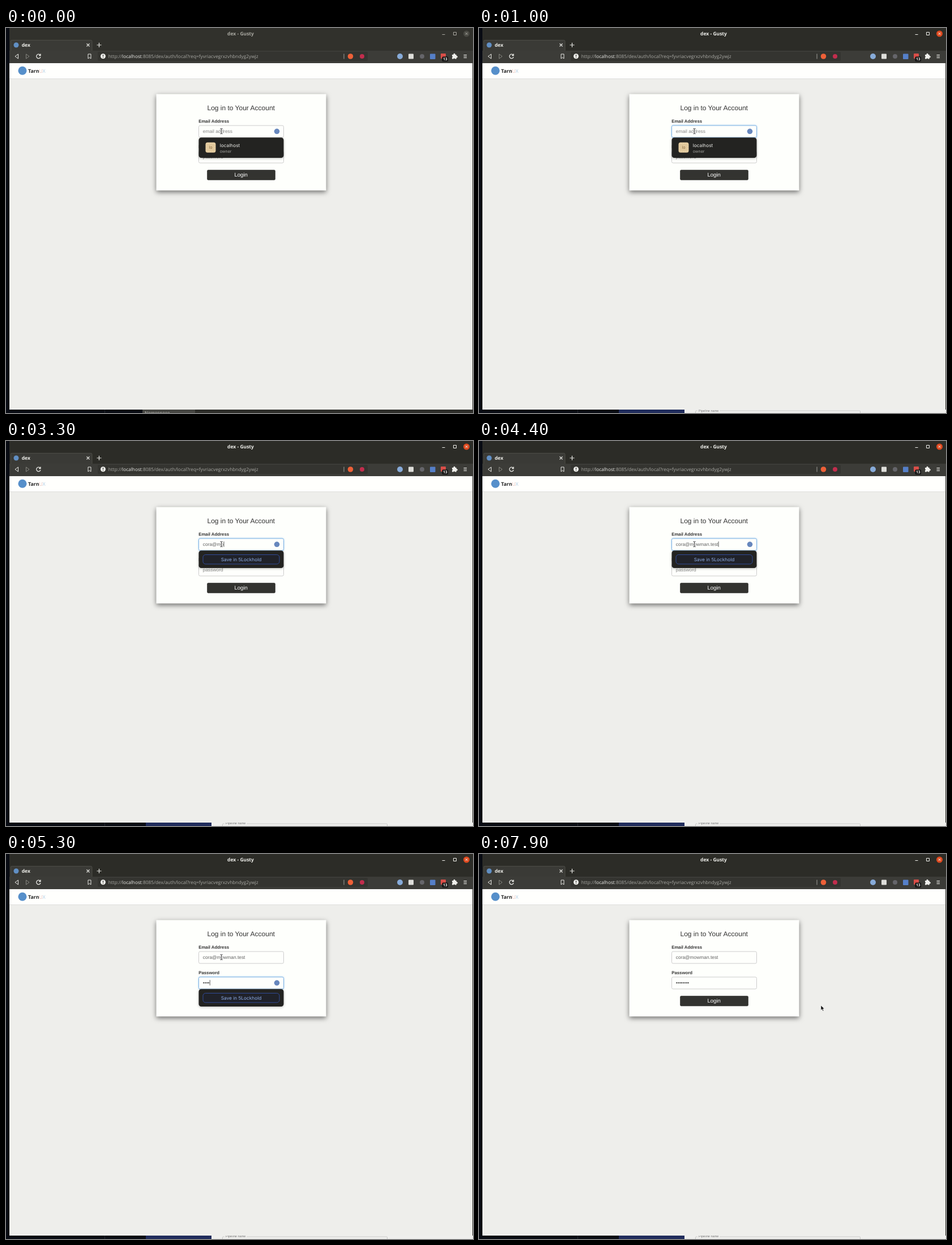
Animation of 825x679 px, one loop 8000 ms. Source, as an HTML page:

```html
<!DOCTYPE html>
<html lang="en">
<head>
<meta charset="utf-8">
<title>Login form</title>
<style>
  html, body { margin: 0; width: 100%; height: 100%; overflow: hidden; background: #080b13; }
  svg { display: block; width: 100%; height: 100%; }
  text { font-family: "Liberation Sans", Arial, sans-serif; font-size: 8.4px; text-rendering: geometricPrecision; white-space: pre; }
  .chrome { font-family: "Open Sans", sans-serif; font-size: 8.3px; fill: #a9a9a4; }
  .bold { font-weight: bold; font-size: 8.5px; fill: #f2f2ee; }
  .mid { text-anchor: middle; }
  .label { font-size: 7.8px; font-weight: bold; fill: #333; }
  .popup text { font-family: Inter, sans-serif; font-size: 8.3px; fill: #ecece8; }
  .line { fill: none; stroke: #e8e8e4; }
  .field { fill: #fefffc; stroke: #ccc; }
  .field.focus { stroke: #7fb1e4; filter: drop-shadow(0 0 1.5px #66afe999); }
</style>
</head>
<body>
<svg viewBox="0 0 825 679">
  <rect width="825" height="679" fill="#080b13"/>

  <!-- windows peeking out below -->
  <g id="behindDark">
    <path d="M241 670h93v9h-93z" fill="#464642"/>
    <path d="M334 670h491v9H334z" fill="#2d2d29"/>
    <text x="245" y="682" font-size="7" fill="#c5c5c0">Namespace</text>
  </g>
  <g id="behindLight">
    <path d="M247 670h116v9H247z" fill="#202c5c"/>
    <path d="M363 670h462v9H363z" fill="#efefed"/>
    <path d="M382.5 679v-3q0-1 1-1h289q1 0 1 1v3" fill="none" stroke="#c9c9c7"/>
    <path d="M386 673h39v4h-39z" fill="#efefed"/>
    <text id="behindText" x="388" style="font-size:5.6px" fill="#777">Pipeline name</text>
  </g>
  <path d="M174.500 673v6" stroke="#25282c"/>

  <!-- browser window -->
  <rect id="titleBar" x="6" width="819" height="41"/>
  <path d="M8 41V23q0-2 2-2h140q2 0 2 2v18z" fill="#3a3a36"/>
  <path d="M8.500 40V23q0-1.500 2-1.500h139q2.500 0 2.500 2V40" fill="none" stroke="#4c4c47"/>
  <rect x="6" y="40" width="819" height="22" fill="#3c3c38"/>
  <rect x="162" y="42" width="477" height="16" rx="2" fill="#343430"/>
  <text id="title" class="chrome bold mid" x="414.500" y="13">dex - Gusty</text>
  <g id="controls" fill="none">
    <path d="M770.500 11.500h5M790.500 7.500h5v5h-5z"/>
    <circle id="closeDisc" cx="813.500" cy="10" r="5.500" stroke="none"/>
    <path d="M811.500 8l4 4m0-4l-4 4"/>
  </g>
  <circle cx="18" cy="30" r="4.500" fill="#618fc4"/>
  <text class="chrome bold" x="27.700" y="33">dex</text>
  <path class="line" stroke-width="1.200" d="M142.500 27.500l5 5m0-5l-5 5M160.500 30h8m-4-4v8"/>

  <path class="line" d="M21.500 46v8l-5.500-4z"/>
  <path class="line" style="stroke:#85857f" d="M35.500 46v8l5.500-4z"/>
  <path class="line" stroke-width="1.300" d="M60.300 47.500a3.700 3.700 0 1 0 .7 3.500M61 45.500v3h-3"/>
  <path class="line" d="M145 46h5v8l-2.500-2-2.500 2z"/>
  <circle cx="171.500" cy="49.700" r="4.500" fill="#eeeeea"/>
  <path d="M171.500 47v3.300m0 1v1.200" stroke="#343430" stroke-width="1.200"/>
  <text class="chrome" x="180.700" y="52.700">http://<tspan fill="#ededea">localhost</tspan>:8085/dex/auth/local?req=fyvriacvegrxzvhbndyg2ywjz</text>
  <path d="M597 45.500v9" stroke="#a0a09a"/>
  <circle cx="608.500" cy="50" r="4.800" fill="#ee6038"/>
  <circle cx="629" cy="50" r="4" fill="#c22d4d"/>
  <circle cx="696" cy="50" r="5" fill="#87abd9"/>
  <rect x="711" y="45.500" width="9" height="9" rx="1" fill="#dededa"/>
  <circle cx="735" cy="50" r="4" fill="#65656a"/>
  <rect x="749" y="45.500" width="9.500" height="9.500" rx="1" fill="#557fc8"/>
  <rect x="768" y="45" width="9" height="9" rx="1" fill="#d94e48"/>
  <rect x="770.500" y="50.500" width="10.500" height="8.500" rx="1.500" fill="#111"/>
  <text class="chrome bold mid" x="775.700" y="57.400" style="font-size:6.7px">13</text>
  <path d="M788 47h2.500a1.600 1.600 0 1 1 3 0h2.200v2.300a1.600 1.600 0 1 1 0 3v2.200h-2.500a1.400 1.400 0 0 0-2.600 0H788v-2.600a1.400 1.400 0 0 0 0-2.600z" fill="#f0f0ec"/>
  <path class="line" d="M808.500 47.500h5.500m-5.500 2.500h5.500m-5.500 2.500h5.500"/>

  <!-- page -->
  <rect x="6" y="62" width="818" height="611" fill="#eeeeeb"/>
  <rect x="6" y="62" width="818" height="27.500" fill="#fffffd" style="filter:drop-shadow(0 .6px .6px #0006)"/>
  <path d="M824.500 62v611" stroke="#33332f"/>
  <circle cx="29" cy="75.300" r="7.500" fill="#568fca"/>
  <text class="chrome bold" x="39" y="78.600" style="font-size:8.800px;fill:#252525">Tarn<tspan font-weight="300" fill="#dc958c">U</tspan><tspan font-weight="300" fill="#7faed6">X</tspan></text>

  <rect x="265.500" y="116.500" width="300" height="170" fill="#fefffc" style="filter:drop-shadow(0 3px 4.500px #0008)"/>
  <text class="mid" x="415.200" y="145" style="font-size:12px" fill="#333">Log in to Your Account</text>
  <text class="label" x="340.200" y="167.300">Email Address</text>
  <text class="label" x="340.200" y="212.300">Password</text>
  <rect id="emailField" class="field" x="340.500" y="172" width="150" height="21" rx="2.400"/>
  <rect id="passField" class="field" x="340.500" y="217" width="150" height="21" rx="2.400"/>
  <text id="email" x="347.800" y="185.200"></text>
  <text id="pass" x="347.800" y="230.200"></text>
  <path id="caret" d="M.5-8v9.500" stroke="#333" stroke-width=".8"/>
  <circle id="keyIcon" cx="478.500" r="4.800" fill="#6787bd"/>
  <rect x="355.500" y="250.500" width="120" height="17.500" rx="1.800" fill="#333330" stroke="#282825" stroke-width=".6"/>
  <text class="mid" x="415.200" y="262.200" style="font-size:9.600px" fill="#fff">Login</text>

  <g id="popup" class="popup">
    <rect id="popupBox" width="150" rx="4.500" fill="#232321" style="filter:drop-shadow(0 1px 2px #0004)"/>
    <g id="account">
      <rect x="12" y="8.500" width="18" height="18" rx="3.500" fill="#e2c99c"/>
      <rect x="13.500" y="10" width="15" height="15" rx="2.500" fill="none" stroke="#f3e3c2" stroke-width=".7" stroke-dasharray="2 2"/>
      <text class="mid" x="21" y="20.200" style="font-size:7.300px;fill:#8b6e45">lo</text>
      <text x="37.300" y="16.800">localhost</text>
      <text x="37.300" y="26.600" style="font-size:7px;fill:#a5a5a0">owner</text>
    </g>
    <g id="save">
      <rect x="7.500" y="-8.200" width="135" height="16.500" rx="4.500" fill="#20222a" stroke="#3451a6" stroke-width=".9"/>
      <text class="mid" x="75" y="3" style="fill:#8cade6">Save in 5Lockhold</text>
    </g>
  </g>

  <g id="beam" fill="none">
    <path id="beamHalo" d="M-2-4.500h1.500L0-4l.5-.5H2M0-4v8M-2 4.500h1.500L0 4l.5.500H2" stroke="#fff" stroke-width="2.200"/>
    <path d="M-2-4.500h1.500L0-4l.5-.5H2M0-4v8M-2 4.500h1.500L0 4l.5.500H2" stroke="#222" stroke-width=".9"/>
  </g>
  <path id="arrow" d="M0 0v8.500l2-1.800 1.400 3.200 1.500-.7-1.400-3.100h2.700z" fill="#111" stroke="#fff" stroke-width=".6"/>
</svg>
<script>
const $ = id => document.getElementById(id);
const show = (id, on) => $(id).setAttribute("visibility", on ? "inherit" : "hidden");
const place = (id, x, y) => $(id).setAttribute("transform", `translate(${x} ${y})`);
const paint = (id, attr, color) => $(id).setAttribute(attr, color);

const ADDRESS = "cora@mowman.test";
const emailKeys = [1400, 1500, 1700, 1900, 2700, 3100, 3300, 3500, 3600, 3800, 3900, 4000, 4100, 4300, 4300, 4400];
const passKeys = [4900, 5000, 5100, 5300, 5500, 5600, 5700, 5900];
const caretOff = [[1000, 1400], [2500, 2700], [6500, 7000]];
// time, x, y of the pointer; it jumps from one place to the next
const pointer = [[0, 380.500, 182], [7100, 402, 168], [7200, 440, 227], [7500, 570, 240], [7600, 692, 260.500], [7700, 630, 248.500], [7900, 604, 267]];
const FOCUS = 400, TAB = 4500, BLUR = 7600;

const typed = (keys, t) => keys.filter(k => k <= t).length;

function setText(id, value, placeholder) {
  $(id).textContent = value || placeholder;
  paint(id, "fill", value ? "#626262" : "#858585");
}

function drawPopup(t, inPassword) {
  const open = t < TAB || t >= TAB + 100 && t < BLUR;
  const account = inPassword ? t < 5000 : t < 1500;
  const save = inPassword || !account;
  show("popup", open);
  show("account", open && account);
  show("save", open && save);
  place("popup", 340.500, inPassword ? 238.200 : 193.200);
  place("save", 0, account ? 42 : 15.500);
  $("popupBox").setAttribute("height", account ? (save ? 57.300 : 35.800) : 30.800);
}

function drawWindow(active, t) {
  const ink = active ? "#f2f2ee" : "#aaa9a2";
  paint("titleBar", "fill", active ? "#2c2c27" : "#31312c");
  $("title").style.fill = ink;
  paint("controls", "stroke", ink);
  paint("closeDisc", "fill", active ? "#df4a20" : "#4a4a44");
  show("behindDark", !active);
  show("behindLight", active);
  $("behindText").setAttribute("y", t < 1500 ? 677 : 675.500);
}

function draw(t) {
  const active = t >= FOCUS, inPassword = t >= TAB, blurred = t >= BLUR;
  drawWindow(active, t);

  setText("email", ADDRESS.slice(0, typed(emailKeys, t)), "email address");
  const dots = typed(passKeys, t);
  setText("pass", "•".repeat(dots), "password");
  if (dots) paint("pass", "fill", "#444");
  $("emailField").classList.toggle("focus", active && !inPassword);
  $("passField").classList.toggle("focus", inPassword && !blurred);

  const current = inPassword ? "pass" : "email";
  const count = inPassword ? dots : typed(emailKeys, t);
  const width = count ? $(current).getComputedTextLength() : 0;
  place("caret", 348 + width, inPassword ? 230.200 : 185.200);
  show("caret", active && !blurred && !caretOff.some(([a, b]) => t >= a && t < b));
  $("keyIcon").setAttribute("cy", inPassword ? 227.300 : 182.300);
  show("keyIcon", !blurred);
  drawPopup(t, inPassword);

  const [, x, y] = pointer.findLast(p => p[0] <= t);
  const isArrow = t >= 7500;
  show("beam", !isArrow);
  show("arrow", isArrow);
  place(isArrow ? "arrow" : "beam", x, y);
}

const start = performance.now();
function frame() {
  draw((performance.now() - start) % 8000);
  requestAnimationFrame(frame);
}
frame();
</script>
</body>
</html>
```
